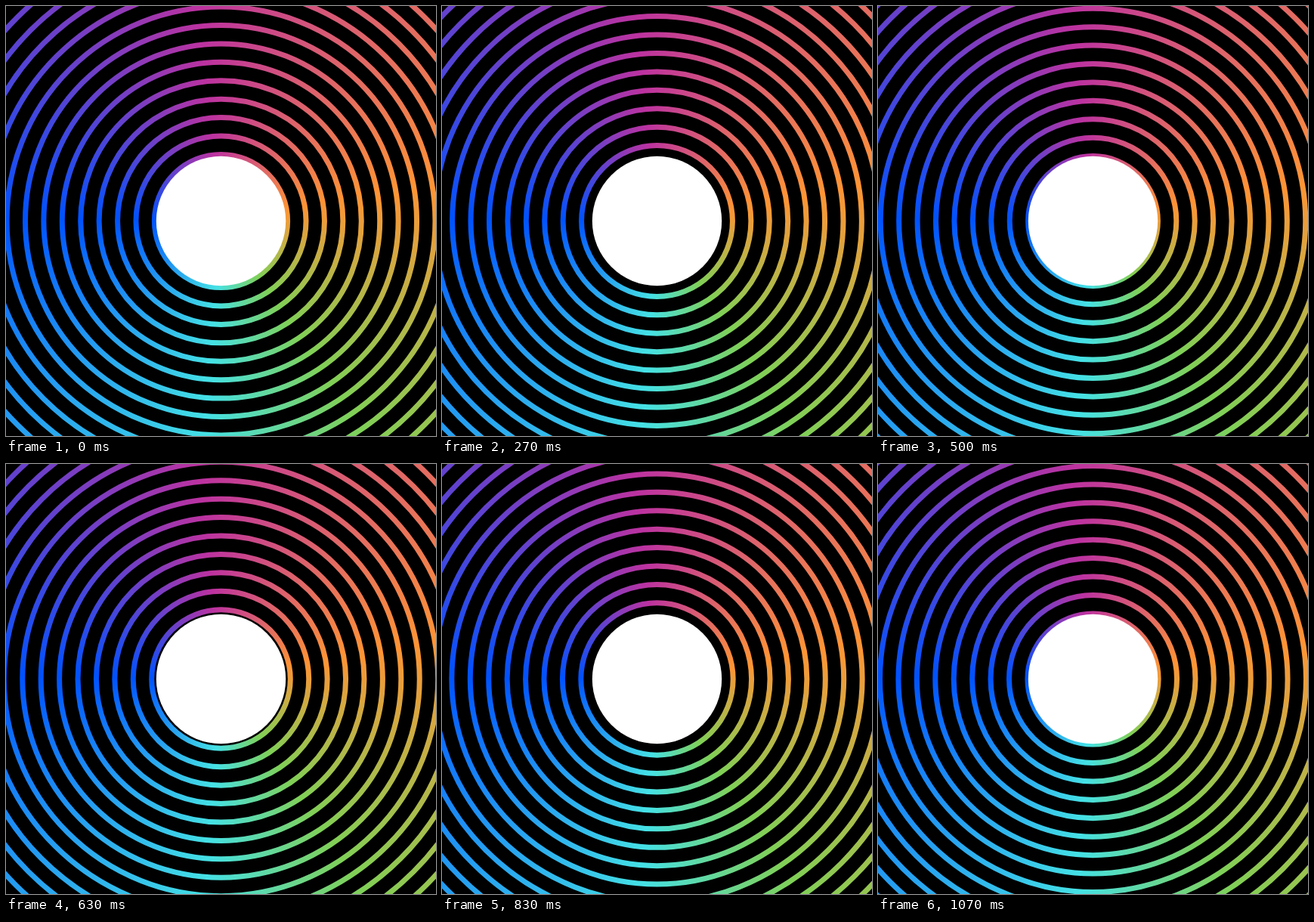
An HTML page with a canvas that plays this animation: 569x569 px, repeating every 1.11 s.

```html
<!DOCTYPE html>
<html lang="en">
<head>
<meta charset="utf-8">
<title>Rainbow rings</title>
<style>
  html, body { margin: 0; width: 100%; height: 100%; overflow: hidden; background: #000; }
  canvas { display: block; }
</style>
</head>
<body>
<canvas id="stage" width="569" height="569"></canvas>
<script>
const SIZE = 569, MID = SIZE / 2;
const LOOP = 1110, STEPS = 33, CYCLES = 2;
const GAP = 24.42, FIRST = 88.1, LINE = 7, DISC = 85.7;

const ctx = document.getElementById('stage').getContext('2d');
const rad = deg => deg * Math.PI / 180;

// Colours clockwise, in degrees from the magenta stop just left of the top
const rainbow = ctx.createConicGradient(rad(-96), MID, MID);
[
  [0, '#bc32a0'],
  [86, '#ff9435'],
  [152, '#80d057'],
  [190, '#45e1e5'],
  [277, '#0052ff'],
  [360, '#bc32a0']
].forEach(([deg, color]) => rainbow.addColorStop(deg / 360, color));

// Steps fall every 33.3 ms, rounded to 10 ms
function stepAt(time) {
  const tick = Math.floor((time % LOOP) / 10) * 10;
  return Math.min(STEPS - 1, Math.floor((tick + 5) * 0.03));
}

function draw(step) {
  const shift = (step * CYCLES / STEPS) % 1 * GAP;

  ctx.fillStyle = '#000';
  ctx.fillRect(0, 0, SIZE, SIZE);

  ctx.beginPath();
  for (let r = FIRST - GAP + shift; r < MID * 1.5; r += GAP) {
    ctx.moveTo(MID + r, MID);
    ctx.arc(MID, MID, r, 0, 2 * Math.PI);
  }
  ctx.strokeStyle = rainbow;
  ctx.lineWidth = LINE;
  ctx.stroke();

  ctx.beginPath();
  ctx.arc(MID, MID, DISC, 0, 2 * Math.PI);
  ctx.fillStyle = '#fff';
  ctx.fill();
}

let start = null;
function play(now) {
  if (start === null) start = now;
  draw(stepAt(now - start));
  requestAnimationFrame(play);
}
draw(0);
requestAnimationFrame(play);
</script>
</body>
</html>
```
